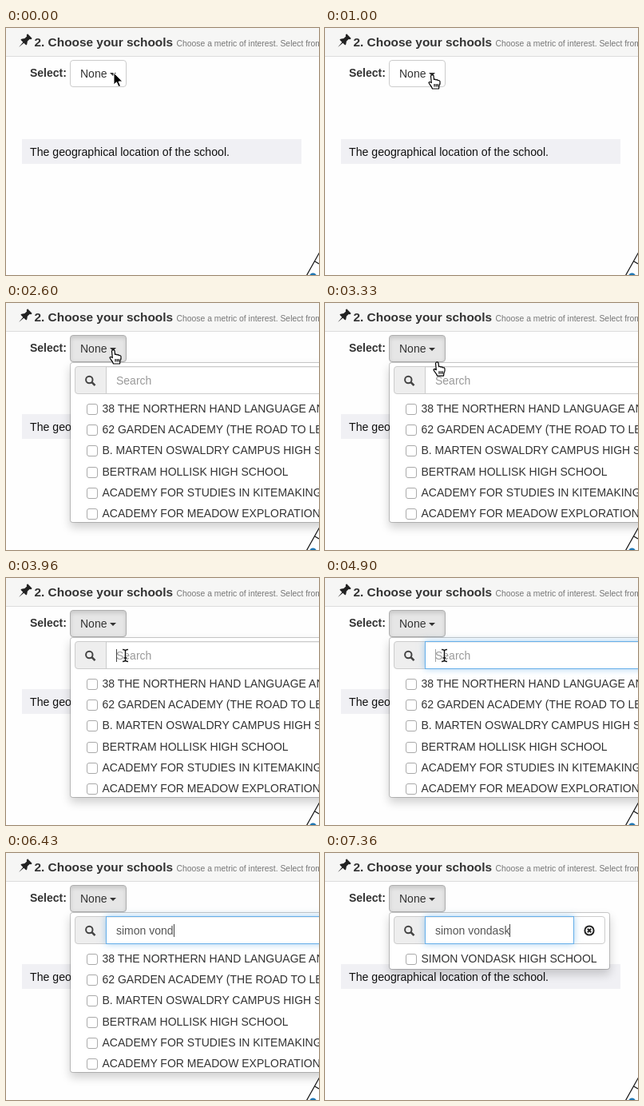
Animation, 392 px wide and 309 px high, one loop 8000 ms. Source, as an HTML page:

```html
<!DOCTYPE html>
<html lang="en">
<head>
<meta charset="utf-8">
<title>School picker</title>
<style>
  html, body { margin: 0; width: 100%; height: 100%; overflow: hidden; }
  body { position: relative; background: #fefefe; color: #333;
         font: 14px/20px "Liberation Sans", Arial, sans-serif; white-space: pre; }
  * { box-sizing: border-box; }
  div, svg { position: absolute; }
  svg { left: 0; top: 0; overflow: visible; }

  #header { left: 0; top: 0; width: 100%; height: 36px; background: #f6f6f5; border-bottom: 1px solid #ddd; }
  #title { left: 35.5px; top: 8px; font-size: 15.4px; font-weight: bold; }
  #hint { left: 213.5px; top: 10px; font-size: 10.4px; color: #777; }
  #label { left: 30px; top: 46px; font-weight: bold; }
  #note { left: 20px; top: 139px; width: 350px; height: 31px; padding: 6px 10px;
          background: #f0f0f4; color: #111; font-size: 14.15px; }

  #button { left: 80px; top: 40px; width: 71px; height: 34px; padding: 6px 12px;
            border: 1px solid #ccc; border-radius: 4px; background: #fff; }
  #button.hover { background: #e6e6e6; border-color: #adadad; }
  #button.down { box-shadow: inset 0 3px 5px rgba(0,0,0,.125); }
  #button div { left: 49px; top: 15px; border: 4px solid transparent; border-top-color: #333; border-bottom: 0; }

  #menu { left: 80px; top: 74px; width: 480px; height: 201px; background: #fff;
          border: 1px solid rgba(0,0,0,.2); border-radius: 4px; background-clip: padding-box;
          box-shadow: 0 6px 12px rgba(0,0,0,.175); }
  #menu.filtered { width: 277px; height: 72px; }
  #addon, #clear { top: 4px; width: 40px; height: 35px; border: 1px solid #ccc; }
  #addon { left: 5px; background: #eee; border-radius: 4px 0 0 4px; }
  #clear { left: 230px; border-radius: 0 4px 4px 0; }
  #input { left: 44px; top: 4px; width: 430px; height: 35px; padding: 7px 12px;
           border: 1px solid #ccc; background: #fff; color: #555; }
  #menu.filtered #input { width: 187px; }
  #placeholder { left: 12px; top: 7px; color: #999; }
  #caret { display: inline-block; position: relative; }
  #caret::after { content: ""; position: absolute; left: 0; top: -13px; width: 1px; height: 16px; background: #444; }
  #list { left: 0; top: 47px; }
  .row { left: 39.5px; }
  .row::before { content: ""; position: absolute; left: -20px; top: 4px; width: 12px; height: 12px;
                 border: 1px solid #aaa; border-radius: 3px; background: #fff; }
</style>
</head>
<body>
<div id="header"></div>
<div id="title">2. Choose your schools</div>
<div id="hint">Choose a metric of interest. Select from the list</div>
<div id="label">Select:</div>
<div id="note">The geographical location of the school.</div>
<svg width="392" height="309" fill="none">
  <path transform="translate(24.5 15.5) rotate(45) scale(.88 .95)" fill="#222"
        d="M-4.5-8H4.5V-6L2.8-5V-1L5.5 2.5V4H.8L0 12.5L-.8 4H-5.5V2.5L-2.8-1V-5L-4.5-6Z"/>
  <circle cx="384.5" cy="311" r="4.5" fill="#1f77b4"/>
  <path d="M392.5 281L376.5 309.5M386 291.5L392 295" stroke="#111" stroke-width="1.2"/>
</svg>
<div id="button">None<div></div></div>

<div id="menu">
  <div id="addon"></div>
  <div id="clear"></div>
  <div id="input"><div id="placeholder">Search</div><span id="typed"></span><span id="caret"></span></div>
  <svg width="10" height="10" fill="none" stroke="#444" stroke-width="2">
    <g transform="translate(-81 -75)">
      <circle cx="104.3" cy="96" r="4.2"/>
      <path d="M107.5 99.2L111.5 103.2" stroke-width="2.6"/>
      <g id="clearIcon" stroke="#222"><circle cx="331" cy="97" r="5.6"/><path d="M328.8 94.8l4.4 4.4m0-4.4l-4.4 4.4"/></g>
    </g>
  </svg>
  <div id="list"></div>
</div>

<svg id="cursor" width="20" height="20" stroke-linejoin="round">
  <path id="arrow" fill="#000" stroke="#fff" d="M0 0V15L3.5 11.8L6 17.5L8.5 16.5L6 11H10.8Z"/>
  <g id="hand" fill="#fff" stroke="#000" stroke-width="1.2">
    <path d="M-2 1.5Q-.3-1 1.5 1.2L2 6Q3.5 5 4.5 6.5Q6 5.7 7 7.2Q9 6.5 9.5 8.5Q10 11 8.5 14L8 17.5H0Q-.5 15.5-3 12.5L-4.5 10Q-4 8-1.2 10Z"/>
    <path d="M2.5 11.5v3.5m2.2-3.5v3.5m2.1-3.5v3.5"/>
  </g>
  <g id="beam" fill="none">
    <defs><path id="beamShape" d="M-3.5-7.5Q0-7.5 0-5.5Q0-7.5 3.5-7.5M0-5.5V5.5M-3.5 7.5Q0 7.5 0 5.5Q0 7.5 3.5 7.5M-2 3H2"/></defs>
    <use href="#beamShape" stroke="#fff" stroke-width="2.6"/>
    <use href="#beamShape" stroke="#111" stroke-width="1.4"/>
  </g>
</svg>

<script>
const LOOP = 8000, HOVER = 1200, PRESS = 2060, OPEN = 2600, FOCUS = 3960, TYPE = 5130, FILTER = 7300;
const QUERY = "simon vondask";
const KEY_TIMES = [5130, 5220, 5310, 5400, 5760, 5900, 6100, 6210, 6320, 6430, 7360, 7360, 7360];
const SCHOOLS = [
  "38 THE NORTHERN HAND LANGUAGE AND STORY SCHOOL",
  "62 GARDEN ACADEMY (THE ROAD TO LEARNING)",
  "B. MARTEN OSWALDRY CAMPUS HIGH SCHOOL",
  "BERTRAM HOLLISK HIGH SCHOOL",
  "ACADEMY FOR STUDIES IN KITEMAKING",
  "ACADEMY FOR MEADOW EXPLORATION"
];
const $ = id => document.getElementById(id);
const show = (id, on) => { $(id).style.display = on ? "" : "none"; };
const clamp = x => Math.min(1, Math.max(0, x));
const mix = (a, b, p) => a + (b - a) * p;

// Fraction covered after equal jumps, the first at start and the last at end.
const stepped = (t, start, end, count) =>
  t < start ? 0 : Math.min(1, (Math.floor((t - start) / (end - start) * (count - 1) + 1e-6) + 1) / count);

function fillList(names) {
  $("list").replaceChildren(...names.map((name, i) => {
    const row = document.createElement("div");
    row.className = "row";
    row.textContent = name;
    row.style.top = i * 26.2 + "px";
    return row;
  }));
}

function cursorAt(t) {
  if (t < 260) return ["arrow", 135, 56];
  if (t < 1000) {
    const p = stepped(t, 600, 830, 6);
    return ["hand", mix(139.5, 135.5, p), mix(64, 58, p)];
  }
  if (t >= TYPE) return ["", 0, 0];
  if (t >= 3800) return ["beam", 149.5, 97];
  const p = stepped(t, 3200, 3560, 7), y = mix(58.5, 94, p);
  return [y < 74 ? "hand" : y < 80 ? "arrow" : "beam", mix(134.5, 148.5, p), y];
}

function caretOpacity(t) {
  if (t < FOCUS) return 0;
  if (t < 4430 || t >= 4930) return 1;
  return t < 4500 || t >= 4900 ? 0.5 : 0;
}

let wasFiltered = null;
function draw(t) {
  const filtered = t >= FILTER;
  if (filtered !== wasFiltered) {
    fillList(filtered ? [QUERY.toUpperCase() + " HIGH SCHOOL"] : SCHOOLS);
    wasFiltered = filtered;
  }
  $("button").className = (t >= HOVER ? "hover " : "") + (t >= PRESS ? "down" : "");
  show("menu", t >= OPEN);
  $("menu").className = filtered ? "filtered" : "";
  show("clear", filtered);
  show("clearIcon", filtered);

  const focus = clamp((t - FOCUS) / 150);
  $("input").style.borderColor = `rgb(${mix(204, 102, focus)},${mix(204, 175, focus)},${mix(204, 233, focus)})`;
  $("input").style.boxShadow =
    `inset 0 1px 1px rgba(0,0,0,.075), 0 0 8px rgba(102,175,233,${0.6 * focus})`;
  show("placeholder", t < TYPE);
  $("typed").textContent = QUERY.slice(0, KEY_TIMES.filter(k => k <= t).length);
  $("caret").style.opacity = caretOpacity(t);

  const [shape, x, y] = cursorAt(t);
  for (const id of ["arrow", "hand", "beam"]) show(id, id === shape);
  $("cursor").style.transform = `translate(${x}px,${y}px)`;
}

const startTime = performance.now();
function tick() {
  draw((performance.now() - startTime) % LOOP);
  requestAnimationFrame(tick);
}
tick();
</script>
</body>
</html>
```
